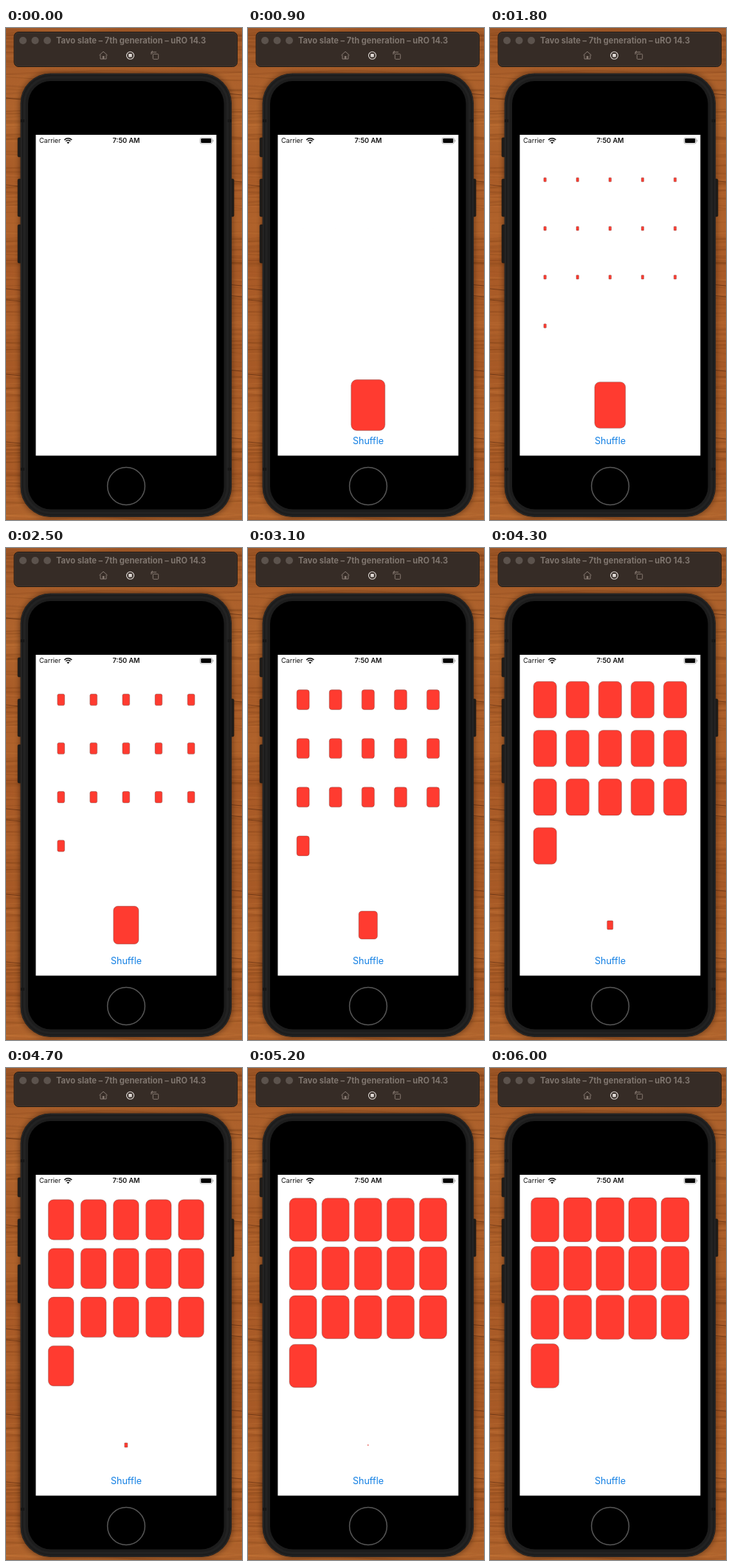
Recreate the animation shown at these times as an HTML page with a canvas. Size 320 by 668 pixels, loop 6.1 s.

```html
<!DOCTYPE html>
<html lang="en">
<head>
<meta charset="utf-8">
<title>Dealing cards</title>
<style>
  html, body { margin: 0; width: 100%; height: 100%; overflow: hidden; background: #a65a27; }
  canvas { display: block; width: 320px; height: 668px; }
</style>
</head>
<body>
<canvas id="stage"></canvas>
<script>
const W = 320, H = 668;
const LOOP = 6100, STEP = 100;
const FADE_START = 400, FADE_TIME = 250;
const DEAL_START = 744, DEAL_TIME = 5000;
const FONT = 'Inter, Roboto, "Liberation Sans", sans-serif';
const dpr = window.devicePixelRatio || 1;

function prepare(canvas) {
  canvas.width = W * dpr;
  canvas.height = H * dpr;
  const c = canvas.getContext('2d');
  c.scale(dpr, dpr);
  return c;
}

const stage = document.getElementById('stage');
const ctx = prepare(stage);
const backdrop = document.createElement('canvas');
const bg = prepare(backdrop);

function box(c, x, y, w, h, r, fill, stroke, line = 1) {
  c.beginPath();
  c.roundRect(x, y, w, h, r);
  if (fill) { c.fillStyle = fill; c.fill(); }
  if (stroke) { c.strokeStyle = stroke; c.lineWidth = line; c.stroke(); }
}

function disc(c, x, y, r, fill, stroke, line = 1) {
  c.beginPath();
  c.arc(x, y, r, 0, Math.PI * 2);
  if (fill) { c.fillStyle = fill; c.fill(); }
  if (stroke) { c.strokeStyle = stroke; c.lineWidth = line; c.stroke(); }
}

function path(c, points, stroke, line = 1) {
  c.beginPath();
  points.forEach(([x, y]) => c.lineTo(x, y));
  c.strokeStyle = stroke;
  c.lineWidth = line;
  c.stroke();
}

function label(c, str, x, y, size, weight, color, align = 'left') {
  c.font = `${weight} ${size}px ${FONT}`;
  c.textAlign = align;
  c.fillStyle = color;
  c.fillText(str, x, y);
}

function seeded(seed) {
  return () => {
    seed = (seed * 16807) % 2147483647;
    return seed / 2147483647;
  };
}

function drawWood() {
  const rand = seeded(41);
  const tones = ['#9a5425', '#ac602b', '#b0642d', '#a85b27', '#b0622b', '#a85926',
                 '#ac5e29', '#a65825', '#b0622b', '#a85a26', '#b0642d'];
  const base = bg.createLinearGradient(0, 0, 0, H);
  tones.forEach((tone, i) => base.addColorStop(i / (tones.length - 1), tone));
  bg.fillStyle = base;
  bg.fillRect(0, 0, W, H);

  // Soft grain: broad, faint, slightly slanted streaks.
  for (let i = 0; i < 230; i++) {
    const y = rand() * H, amp = 1 + rand() * 3, phase = rand() * 6;
    const dark = rand() < 0.55;
    bg.strokeStyle = dark ? `rgba(92,42,10,${0.05 + rand() * 0.15})`
                          : `rgba(206,126,64,${0.05 + rand() * 0.13})`;
    bg.lineWidth = 0.8 + rand() * 2.4;
    bg.beginPath();
    for (let x = 0; x <= W; x += 8) bg.lineTo(x, y + amp * Math.sin(x / 37 + phase));
    bg.stroke();
  }
  for (const y of [95, 213, 354, 369, 470, 562]) {
    path(bg, [[0, y], [20, y + 2], [300, y - 6], [320, y - 4]], 'rgba(66,28,8,.5)', 1.2);
  }
}

function drawToolbar() {
  box(bg, 11, 5.5, 302.5, 47, 6, '#362c26', '#211913');
  box(bg, 11.8, 6.3, 300.9, 45.4, 5.5, null, 'rgba(130,115,105,.25)', 0.6);
  for (const x of [23, 39.5, 56]) disc(bg, x, 17, 5, '#5c534d');
  label(bg, 'Tavo slate – 7th generation – uRO 14.3', 68, 20.7, 11.1, 700, '#7f756e');

  const dim = '#857870';
  path(bg, [[126.5, 37], [132, 32], [137.5, 37]], dim);
  path(bg, [[128, 36.5], [128, 42], [136, 42], [136, 36.5]], dim);
  bg.fillStyle = dim;
  bg.fillRect(130.8, 38, 2.6, 4);

  disc(bg, 168.5, 37.3, 5, null, '#ded8d4', 1.1);
  box(bg, 166.2, 35, 4.6, 4.6, 0.7, '#ded8d4');

  box(bg, 199.3, 35.3, 7.4, 7, 1, null, dim);
  path(bg, [[204, 32.8], [197, 32.8], [197, 36]], dim);
  path(bg, [[199, 31], [196.9, 32.8], [199, 34.6]], dim);
}

function drawPhone() {
  for (const [x, y, h] of [[16, 149, 26], [16, 205, 51], [16, 267, 52], [303, 205, 51]]) {
    box(bg, x, y, 6, h, 1.5, '#222120', '#181514', 0.6);
  }
  bg.save();
  bg.shadowColor = 'rgba(20,8,0,.55)';
  bg.shadowBlur = 9 * dpr;
  box(bg, 19.5, 61.5, 286.5, 602.5, 41, '#1c1c1c');
  bg.restore();
  box(bg, 20.5, 62.5, 284.5, 600.5, 40, null, '#2c2b2a', 1);
  box(bg, 25, 67, 275.5, 591.5, 36, null, '#222', 3);
  bg.fillStyle = '#171717';
  for (const y of [124, 597]) {
    bg.fillRect(20, y, 5, 4);
    bg.fillRect(300.5, y, 5, 4);
  }
  box(bg, 30, 72, 265.5, 581.5, 31, '#000');
  disc(bg, 163, 622, 25.4, '#000', '#555', 1.5);
}

function drawStatusBar() {
  label(bg, 'Carrier', 45, 156.4, 9, 400, '#111');
  label(bg, '7:50 AM', 163, 156.4, 9.2, 600, '#111', 'center');

  bg.strokeStyle = '#111';
  bg.lineWidth = 1.5;
  for (const r of [7, 4.4]) {
    bg.beginPath();
    bg.arc(84.2, 156.8, r, -Math.PI * 0.755, -Math.PI * 0.245);
    bg.stroke();
  }
  bg.beginPath();
  bg.moveTo(84.2, 157.2);
  bg.arc(84.2, 157.2, 2.6, -Math.PI * 0.75, -Math.PI * 0.25);
  bg.fillStyle = '#111';
  bg.fill();

  box(bg, 263, 149, 16.6, 8, 2.2, null, '#a5a5a5', 0.8);
  box(bg, 264.3, 150, 14, 6, 1.2, '#000');
  box(bg, 280.4, 151.6, 1, 2.8, 0.5, '#a5a5a5');
}

// Ease-in-out along the cubic Bezier (.42, 0) (.58, 1).
function easeInOut(x) {
  let lo = 0, hi = 1;
  for (let i = 0; i < 24; i++) {
    const t = (lo + hi) / 2, u = 1 - t;
    if (1.26 * u * u * t + 1.74 * u * t * t + t * t * t < x) lo = t;
    else hi = t;
  }
  return lo * lo * (3 - 2 * lo);
}

const clamp = v => Math.min(1, Math.max(0, v));

function drawCard(x, y, w, h, scale) {
  if (scale <= 0.001) return;
  ctx.save();
  ctx.translate(x, y);
  ctx.scale(scale, scale);
  box(ctx, -w / 2, -h / 2, w, h, 7.7, '#ff3b30', 'rgba(95,60,55,.6)', 0.6 / Math.max(scale, 0.1));
  ctx.restore();
}

function draw(time) {
  ctx.drawImage(backdrop, 0, 0, W, H);
  const shown = clamp((time - FADE_START) / FADE_TIME);
  if (!shown) return;
  const dealt = easeInOut(clamp((time - DEAL_START) / DEAL_TIME));

  ctx.globalAlpha = shown;
  for (let i = 0; i < 16; i++) {
    drawCard(74.6 + (i % 5) * 44.1, 206 + Math.floor(i / 5) * 66.15, 37.8, 59.8, dealt);
  }
  drawCard(162.8, 512, 46, 69, 1 - dealt);
  label(ctx, 'Shuffle', 163, 565.2, 12.5, 400, '#1480e4', 'center');
  ctx.globalAlpha = 1;
}

drawWood();
drawToolbar();
drawPhone();
bg.fillStyle = '#fff';
bg.fillRect(40.4, 145, 244.9, 435.6);
drawStatusBar();

const begin = performance.now();
function tick() {
  const time = (performance.now() - begin) % LOOP;
  draw(Math.floor(time / STEP) * STEP);
  requestAnimationFrame(tick);
}
tick();
</script>
</body>
</html>
```
